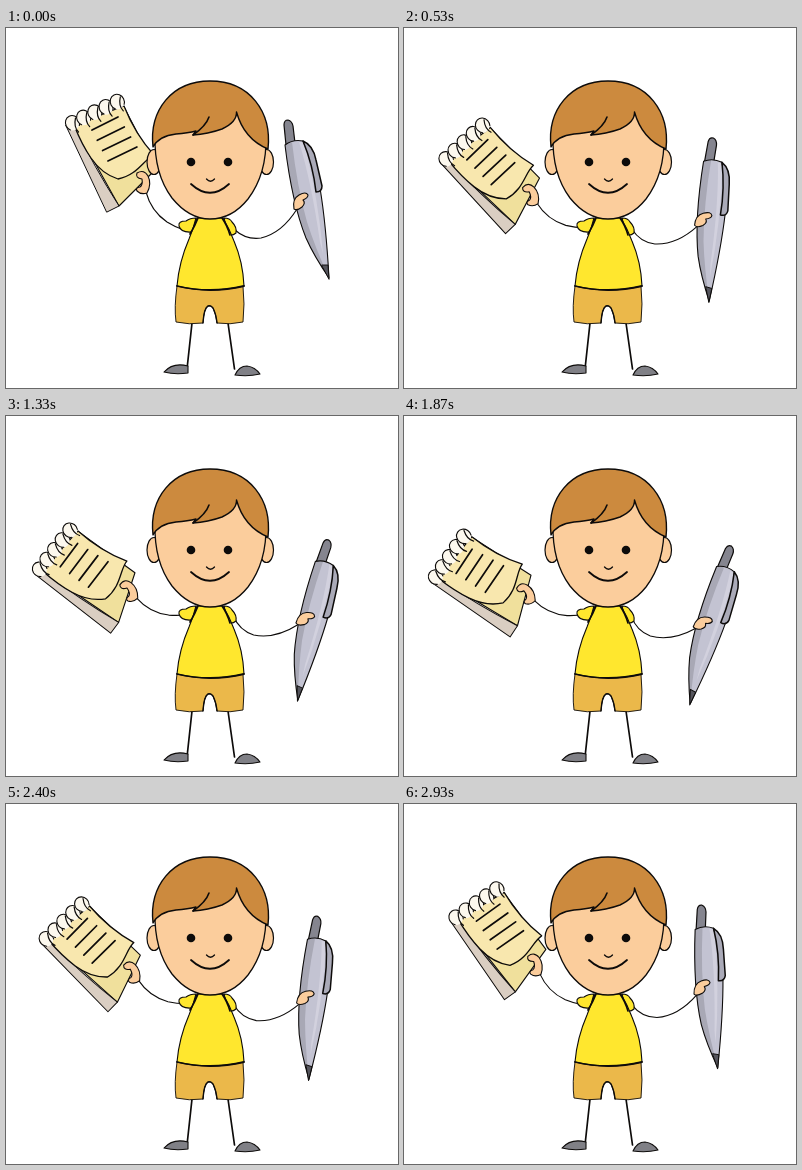
Recreate the animation shown at these times as an HTML page with a canvas. Size 392 px wide and 360 px high, loop 3.47 s.

```html
<!DOCTYPE html>
<html lang="en">
<head>
<meta charset="utf-8">
<title>Boy with notepad and pen</title>
<style>
html, body { margin: 0; width: 100%; height: 100%; overflow: hidden; background: #fff; }
canvas { display: block; }
</style>
</head>
<body>
<canvas id="stage" width="392" height="360"></canvas>
<script>
const ctx = document.getElementById('stage').getContext('2d');
const LOOP = 3470;
const INK = '#0d0b0a', SKIN = '#fbcd9c', HAIR = '#cc8a3e', SHIRT = '#ffe72e', SHORTS = '#ebb84a';

// Held poses: start time in ms, notepad angle, pen angle (degrees of swing)
const POSES = [
  [0, 0, 0], [270, 12.2, 11.8], [530, 17.3, 16], [800, 20.7, 19.1],
  [1070, 24, 23], [1330, 26.8, 25.5], [1600, 29, 28], [1870, 30, 29.2],
  [2130, 24.5, 23.5], [2400, 19, 17.7], [2670, 12, 11], [2930, 9.3, 9]
];

function shape(d, fill, stroke, width = 1.3) {
  const p = new Path2D(d);
  if (fill) { ctx.fillStyle = fill; ctx.fill(p); }
  if (stroke) { ctx.strokeStyle = stroke; ctx.lineWidth = width; ctx.stroke(p); }
}
const line = (d, width) => shape(d, null, INK, width);

function oval(x, y, rx, ry, fill, stroke, width = 1.3) {
  ctx.beginPath();
  ctx.ellipse(x, y, rx, ry, 0, 0, Math.PI * 2);
  ctx.fillStyle = fill;
  ctx.fill();
  if (stroke) { ctx.strokeStyle = stroke; ctx.lineWidth = width; ctx.stroke(); }
}

function swing(x, y, degrees, draw) {
  ctx.save();
  ctx.translate(x, y);
  ctx.rotate(degrees * Math.PI / 180);
  ctx.translate(-x, -y);
  draw();
  ctx.restore();
}

function arm(d, dash) {
  ctx.setLineDash(dash);
  line(d, 1.1);
  ctx.setLineDash([]);
}

function ring(x, y) {
  oval(x, y, 7, 7.6, '#fcf8ee');
  ctx.beginPath();
  ctx.ellipse(x, y, 7, 7.6, -0.4, 2.3, 7);
  ctx.strokeStyle = INK;
  ctx.lineWidth = 1.1;
  ctx.stroke();
  line(`M${x + 3} ${y - 5} Q${x + 1} ${y + 4} ${x + 6} ${y + 9}`, 1.2);
}

function notepad() {
  // back cover, side strip, curled page
  shape('M69 99 L118 79 L150 141 L113 178 Z', '#f0e09c', INK, 1.1);
  shape('M60 97 L68 97 Q88 139 113 178 L101 184 Z', '#dacec2', INK, 1);
  shape('M68 97 L118 78 Q129 106 148 127 C138 131 132 147 112 151 Q96 146 85 130 Q76 117 68 97 Z', '#f8e7ae', INK, 1.3);
  for (let i = 0; i < 4; i++) {
    line(`M${86 + 5.3 * i} ${102 + 10.3 * i} L${112 + 6.3 * i} ${89 + 10 * i}`, 1.7);
  }
  for (let i = 0; i < 5; i++) ring(66.5 + i * 11.2, 95 - i * 5.3);
}

function leftArm(dash) {
  arm('M140 164 Q145 183 161 194 Q169 199 178 202', dash);
  notepad();
  shape('M131 145 Q138 141 142 148 Q146 156 141 165 Q135 167 131 163 Q129 160 134 159 Q137 157 136 151 Q129 150 131 145 Z', SKIN, INK, 1.1);
}

function pen() {
  const body = 'M279 117 Q287 111 297 113 Q309 138 314 160 Q320 196 323 250 Q308 228 300 210 Q286 175 279 117 Z';
  shape('M278 97 Q278 92 282 92 Q286 93 287 98 L289 115 L280 117 Z', '#85858f', INK, 1.2);
  shape(body, '#c3c3d2');
  shape('M279 117 Q286 175 300 210 Q308 228 323 250 Q309 219 301 194 Q291 158 286 114 Z', '#a8a8b5');
  shape('M293 114 Q305 152 314 214 L317 226 Q313 174 298 114 Z', '#d2d1de');
  line(body, 1.1);
  shape('M316 237 L322 237 L323 251 Z', '#55555d', INK, 0.9);
  shape('M297 113 Q307 117 310 132 L316 158 Q316 164 310 164 Q307 137 297 113 Z', '#aaaab8', INK, 1.5);
}

function rightArm(dash) {
  arm('M229 202 Q240 212 255 210 Q276 205 291 181', dash);
  pen();
  shape('M288 181 Q286 171 293 167 Q300 163 302 167 Q302 170 297 172 Q300 175 296 179 Q291 183 288 181 Z', SKIN, INK, 1.1);
}

function legs() {
  line('M186 295 L181 341 M222 295 L228.5 341', 1.7);
  shape('M182 338 Q167 334 158 344 Q169 347 182 345 Z', '#808086', INK, 1.1);
  shape('M229 347 Q233 338 241 338 Q249 339 254 346 Q242 349 229 347 Z', '#808086', INK, 1.1);
}

function clothes() {
  shape('M171 258 Q168 279 170 294 Q183 297 197 295 Q198 280 202 278 Q205 277 207 280 Q210 286 211 295 Q224 297 237 294 Q239 276 237 258 Z', SHORTS, INK, 0.9);
  line('M197 295 Q198 280 202 278 Q205 277 207 280 Q210 286 211 295', 1.4);
  shape('M190 190 Q184 190 180 193 Q172 193 173 198 Q175 205 186 204 Z', SHIRT, INK, 1.1);
  shape('M218 190 Q224 190 226 194 Q231 199 230 205 Q227 208 222 207 Z', SHIRT, INK, 1.1);
  shape('M191 190 Q186 203 183 211 Q173 234 171 258 Q204 266 238 258 Q237 234 228 213 Q223 200 217 190 Z', SHIRT, INK, 1.1);
  line('M192 190 Q189 198 184 206 M216 190 Q221 197 224 207', 1.7);
  line('M171 258 Q204 266 238 258', 1.8);
}

function head() {
  oval(148, 134, 7, 12.5, SKIN, INK, 1.2);
  oval(260.5, 134, 7, 12.5, SKIN, INK, 1.2);
  shape('M149 108 Q148 146 166 170 Q183 191 204 191 Q226 191 242 171 Q261 146 260 108 Q240 76 204 76 Q166 77 149 108 Z', SKIN, INK, 1.3);
  shape('M147 119 C143 82 166 53 204 53 C244 53 266 84 262 121 Q238 111 230.5 84 Q231 94 216 101 Q202 106 187 107 L190 103 Q182 105 170 106 Q153 108 147 119 Z', HAIR, INK, 1.4);
  line('M187 107 Q200 98 203 89', 1.6);
  oval(185, 134, 4.3, 4.3, INK);
  oval(222, 134, 4.3, 4.3, INK);
  line('M200.5 151 Q204.5 155.5 208.5 151', 1.3);
  line('M185 156 Q204 173.5 223 156', 1.8);
}

function draw(t) {
  const i = POSES.findLastIndex(p => p[0] <= t);
  const [, padAngle, penAngle] = POSES[i];
  const dash = i === 1 ? [9, 5] : [];
  ctx.fillStyle = '#fff';
  ctx.fillRect(0, 0, 392, 360);
  ctx.lineCap = ctx.lineJoin = 'round';
  swing(172.5, 193, -padAngle, () => leftArm(dash));
  swing(231.5, 198.3, penAngle, () => rightArm(dash));
  legs();
  clothes();
  head();
}

const start = performance.now();
function tick() {
  draw((performance.now() - start) % LOOP);
  requestAnimationFrame(tick);
}
tick();
</script>
</body>
</html>
```
